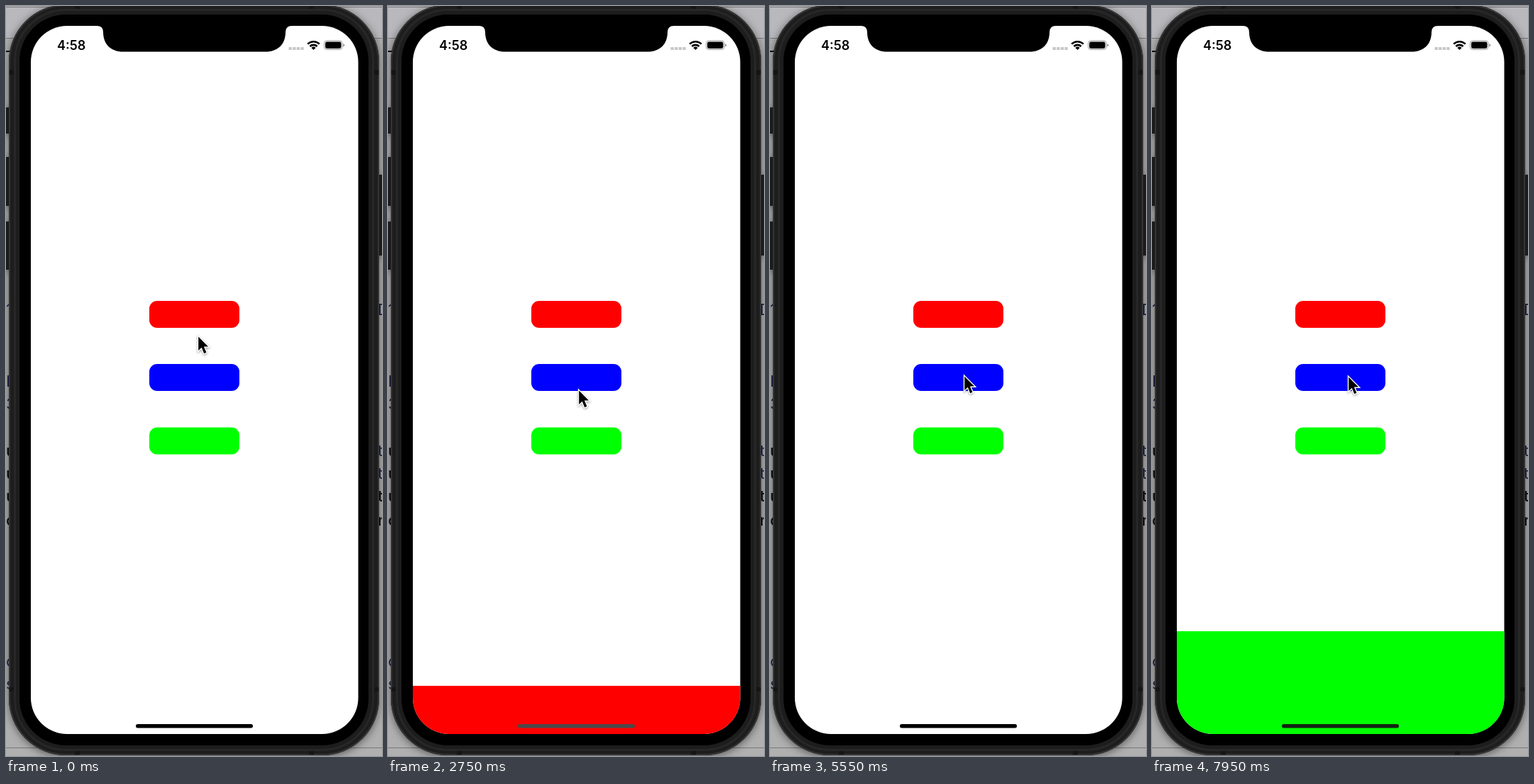
Animation, 530 px wide and 1058 px high, one loop 8 s. Source, as an HTML page:

```html
<!DOCTYPE html>
<html lang="en">
<head>
<meta charset="utf-8">
<title>Colour sheets</title>
<style>
  html, body { margin: 0; width: 100%; height: 100%; overflow: hidden; background: #aaa; }
  svg { display: block; width: 530px; height: 1058px; }
  text { font-family: Inter, Roboto, sans-serif; }
  #body { filter: drop-shadow(0 2px 6px rgba(0, 0, 0, .5)); }
  #cursor { filter: drop-shadow(0 1.5px 1.5px rgba(0, 0, 0, .4)); }
</style>
</head>
<body>
<svg viewBox="0 0 530 1058">
  <defs>
    <clipPath id="screen"><rect x="35" y="28" width="461.5" height="999" rx="51"/></clipPath>
  </defs>

  <!-- desktop behind the phone -->
  <rect width="530" height="1058" fill="#b0b0b0"/>
  <rect width="530" height="45" fill="#b9b9bd"/>
  <path d="M0 1.5H530M0 45.5H530M0 1046.5H530" stroke="#77777c"/>
  <g id="page" font-size="22"></g>

  <!-- phone body -->
  <g id="body">
    <path d="M-4 143H6V180H-4ZM-4 213H6V282H-4ZM-4 304H6V372H-4ZM524 238H534V352H524Z" fill="#1b1b1b"/>
    <rect x="4" y="-2" width="522" height="1059" rx="80" fill="#1d1d1d"/>
  </g>
  <rect x="5" y="-1" width="520" height="1057" rx="79" fill="none" stroke="#343434" stroke-width="2"/>
  <path d="M97 0H104V6H97ZM427 0H434V6H427ZM97 1050H104V1056H97ZM427 1050H434V1056H427Z
           M5 90H12V97H5ZM518 90H525V97H518ZM5 961H12V967H5ZM518 961H525V967H518Z" fill="#151515"/>
  <rect x="12.5" y="5.5" width="505" height="1044" rx="72" fill="none" stroke="#272727" stroke-width="3"/>
  <rect x="19" y="12" width="492" height="1031" rx="66" fill="#000"/>

  <g clip-path="url(#screen)">
    <rect x="34" y="27" width="464" height="1001" fill="#fff"/>
    <rect x="202" y="416" width="127" height="38" rx="11" fill="#f00"/>
    <rect x="202" y="505" width="127" height="38" rx="11" fill="#00f"/>
    <rect x="202" y="594.5" width="127" height="38" rx="11" fill="#0f0"/>
    <g id="sheet">
      <rect id="fill" x="34" y="28" width="464" height="1001"/>
      <rect x="202" y="516.5" width="127" height="38" rx="11" fill="#fff"/>
    </g>

    <!-- status bar -->
    <text x="72" y="62" font-size="18" font-weight="600">4:58</text>
    <path d="M398.5 60H420" stroke="#000" stroke-opacity=".22" stroke-width="4.2" stroke-dasharray="4.4 1.2"/>
    <g fill="none" stroke="#000" stroke-width="2.6">
      <path d="M425.2 53.6A11.8 11.8 0 0 1 441.8 53.6"/>
      <path d="M428.4 57A7.3 7.3 0 0 1 438.6 57"/>
    </g>
    <path d="M433.5 62L430.4 58.9A4.4 4.4 0 0 1 436.6 58.9Z"/>
    <rect x="448.5" y="49" width="25.5" height="12.5" rx="3.8" fill="none" stroke="#000" stroke-opacity=".4"/>
    <rect x="450" y="50.5" width="22.5" height="9.5" rx="2.4"/>
    <path d="M475.3 53.2Q477.2 53.8 477.2 55.3T475.3 57.4Z" fill-opacity=".45"/>

    <rect id="home" x="183" y="1013" width="165" height="5.5" rx="2.75"/>
    <path d="M128 27V28Q137 28 137 37C137 54 148 64.5 165 64.5H366C383 64.5 394 54 394 37Q394 28 403 28V27Z"/>
  </g>

  <g id="cursor">
    <path d="M1.2 2.6V22L5.7 17.8L9.2 26.2L12.4 24.8L8.9 16.6H15Z" stroke="#fff" stroke-width="2.8" paint-order="stroke"/>
  </g>
</svg>

<script>
const LOOP = 8000, TICK = 50, HEIGHT = 1000, STIFFNESS = 22;
const $ = id => document.getElementById(id);

// Times at which each sheet starts to rise and to drop.
const sheets = [
  { color: '#f00', home: '#4a4a4a', rise: 1045, drop: 2552 },
  { color: '#00f', home: '#4a4a4a', rise: 3750, drop: 5045 },
  { color: '#0f0', home: '#132213', rise: 6429, drop: 7795 },
];

// Pointer tip: time, x, y.
const pointer = [
  [0, 270, 464], [200, 278, 437],
  [1900, 278, 437], [2200, 268, 540],
  [3150, 268, 540], [3400, 273, 520],
  [5800, 273, 520], [6100, 279, 612],
  [7000, 279, 612], [7250, 275, 537],
  [7500, 276, 521], [LOOP, 276, 521],
];

const words = [
  [0, '#111', 500, { '–': [71], u: [635, 667, 699], c: [733] }],
  [0, '#26264e', 400, { '1': [436], H: [537], '3': [569], c: [932], s: [964] }],
  [524, '#26264e', 400, { D: [436], t: [635, 667] }],
  [524, '#111', 500, { t: [699], n: [733] }],
];
$('page').innerHTML = words.map(([x, color, weight, glyphs]) =>
  Object.entries(glyphs).map(([glyph, rows]) => rows.map(y =>
    `<text x="${x}" y="${y}" fill="${color}" font-weight="${weight}">${glyph}</text>`
  ).join('')).join('')).join('');

// Critically damped spring from 0 to 1.
function spring(ms) {
  const x = STIFFNESS * Math.max(0, ms) / 1000;
  return 1 - (1 + x) * Math.exp(-x);
}

function pointerAt(t) {
  const next = pointer.findIndex(key => key[0] > t);
  const [t0, x0, y0] = pointer[next - 1], [t1, x1, y1] = pointer[next];
  const p = (t - t0) / (t1 - t0), eased = p * p * (3 - 2 * p);
  return [x0 + (x1 - x0) * eased, y0 + (y1 - y0) * eased];
}

function draw(t) {
  const sheet = sheets.findLast(s => t >= s.rise) || sheets[0];
  const shown = spring(t - sheet.rise) - spring(t - sheet.drop);
  const offset = Math.round(HEIGHT * (1 - shown));
  $('sheet').setAttribute('transform', `translate(0 ${offset})`);
  $('fill').setAttribute('fill', sheet.color);
  $('home').setAttribute('fill', offset < 988 ? sheet.home : '#000');
  $('cursor').setAttribute('transform', `translate(${pointerAt(t)})`);
}

function frame() {
  const t = performance.now() % LOOP;
  draw(Math.floor(t / TICK) * TICK);
  requestAnimationFrame(frame);
}
frame();
</script>
</body>
</html>
```
